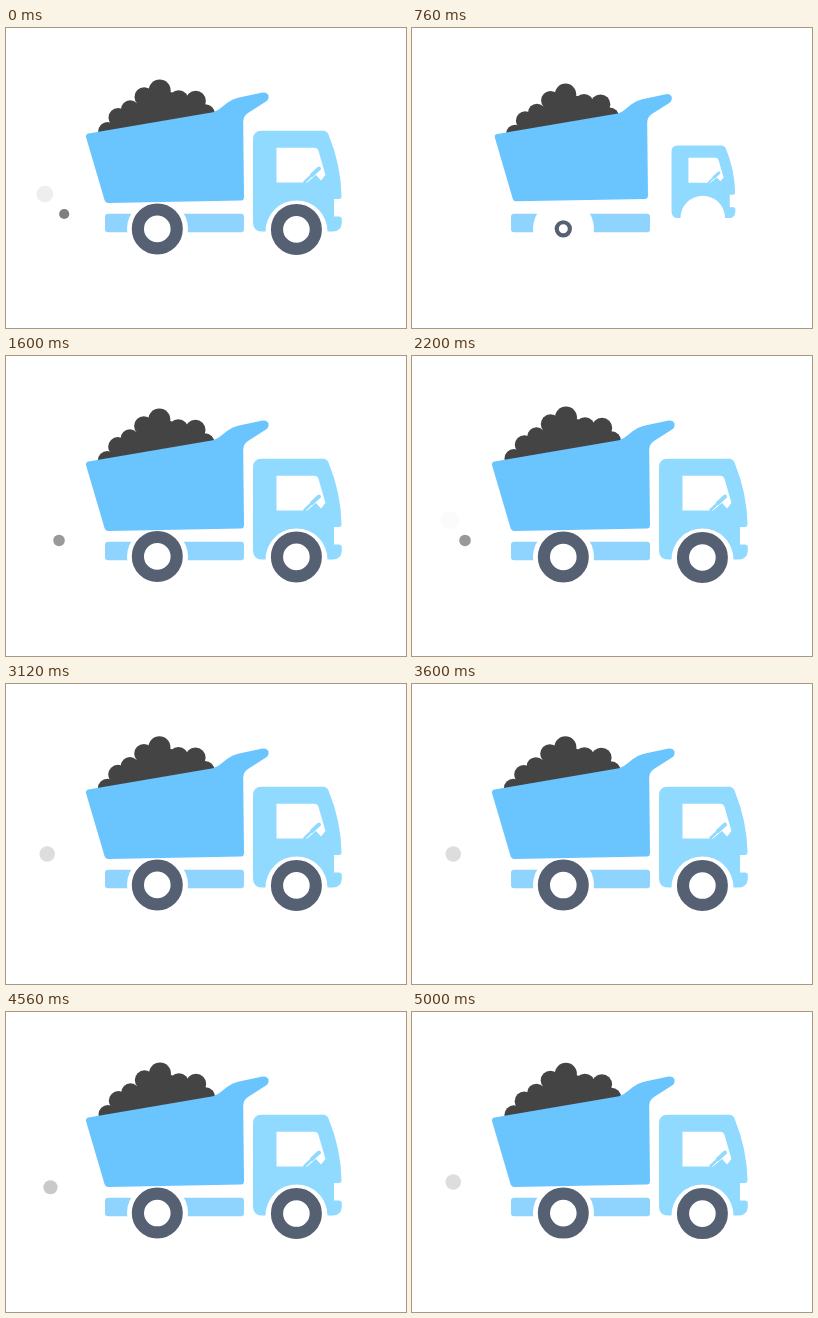
An HTML page that plays this animation: 400x300 px, repeating every 5.04 s.

```html
<!DOCTYPE html>
<html lang="en">
<head>
<meta charset="utf-8">
<title>Dump truck</title>
<style>
  html, body { margin: 0; width: 100%; height: 100%; overflow: hidden; background: #fff; }
  svg { display: block; width: 400px; height: 300px; }
</style>
</head>
<body>
<svg viewBox="0 0 400 300">
  <g id="smoke" fill="#444"></g>
  <g id="chassis">
    <rect x="99" y="185.800" width="139" height="18.5" rx="3" fill="#8fd4ff"/>
    <circle cx="151.5" cy="201" r="30.5" fill="#fff"/>
  </g>
  <g id="tub">
    <g id="coal" fill="#444">
      <path d="M95 108L113 87L125 78L154 60L190 70L208 86V95L100 112Z"/>
      <circle cx="102" cy="102.500" r="9.5"/>
      <circle cx="112.500" cy="88.800" r="9.7"/>
      <circle cx="124.500" cy="80.500" r="9.2"/>
      <circle cx="138.500" cy="68" r="9.7"/>
      <circle cx="154" cy="61.500" r="11"/>
      <circle cx="173" cy="71.300" r="10"/>
      <circle cx="190" cy="72" r="10.2"/>
      <circle cx="199.500" cy="85" r="9.7"/>
    </g>
    <path fill="#6ac5ff" d="M82.500 105.500L207 84.300Q211.500 83 215 79.800L221 74.900Q226 71 232 69.700L256.500 64.500Q261 63.800 262.500 67.500Q263.200 71.500 260 73.500L242 85Q237.300 88 237.200 94L238 169Q238 172.500 235 172.500L102.500 175Q99.500 175 98.500 172L80 109Q79.500 106 82.500 105.500Z"/>
  </g>
  <g id="cab">
    <path fill="#90d9ff" d="M247 111.500Q247 102.800 255.500 102.800H317Q320.800 102.800 322.500 106.500Q335 137 335.500 168Q335.500 171 333 171H328V188.500H333.500Q335.800 188.500 335.800 191V195Q335 203.500 327 203.500H321.500A31 31 0 1 0 259.500 203.500H256Q247 203.500 247 194Z"/>
    <path fill="#fff" d="M270.500 119.700H308Q311.500 119.700 312.500 123L319.500 147L315 152.500L310 147L301 154.500H270.500Z"/>
    <g stroke="#90d9ff" stroke-linecap="round">
      <path stroke-width="2.500" d="M298.500 154L306 147"/>
      <path stroke-width="4" d="M306 147L313 140.500"/>
    </g>
  </g>
  <g fill="none" stroke="#566073" stroke-width="12.2">
    <circle id="rear" cx="151.300" cy="200.800" r="19.4"/>
    <circle id="front" cx="290.400" cy="201.300" r="19.4"/>
  </g>
</svg>
<script>
const LOOP = 5040, STEP = 40, POP = 480;
const el = id => document.getElementById(id);
const wave = (t, period, peak) => Math.cos(2 * Math.PI * (t - peak) / period);

// Each part pops in around its own centre: [id, x, y, start]
const parts = [
  ["chassis", 168.5, 195, 120],
  ["tub", 171, 120, 544],
  ["cab", 291.5, 155.5, 640],
  ["rear", 151.3, 200.8, 714],
  ["front", 290.4, 201.3, 780],
];

// Nine puffs per cycle, then a short pause
const puffs = Array.from({ length: 18 }, (_, i) => {
  const node = document.createElementNS("http://www.w3.org/2000/svg", "circle");
  el("smoke").append(node);
  return { node, birth: 1560 + Math.floor(i / 9) * 1880 + (i % 9) * 200 };
});

function popScale(t) {
  const q = Math.min(1, Math.max(0, t / POP)) - 1;
  return 1 + 2 * q ** 3 + q * q;
}

function drawPuff({ node, birth }, t) {
  const age = (t - birth) / STEP, p = Math.min(1, age / 6);
  const visible = age >= 0 && age < 6.6;
  node.setAttribute("visibility", visible ? "visible" : "hidden");
  if (!visible) return;
  node.setAttribute("cx", 58.2 - 20.5 * (1 - (1 - p) ** 1.6));
  node.setAttribute("cy", 186 - 21.5 * p * p * (3 - 2 * p));
  node.setAttribute("r", 5.1 + 4 * p);
  node.setAttribute("opacity", 0.69 * (1 - age / 6.6) ** 1.45);
}

function draw(now) {
  let t = Math.floor(now % LOOP / STEP) * STEP;
  if (t < STEP) t += LOOP;   // the finished truck holds for one step before it clears

  for (const [id, x, y, start] of parts) {
    const s = popScale(t - start);
    const wheel = id === "rear" || id === "front";
    const bob = wheel && t > start + POP ? -0.4 * wave(t, 354, 1600) : 0;
    el(id).setAttribute("transform", `translate(${x} ${y + bob}) scale(${s}) translate(${-x} ${-y})`);
    el(id).setAttribute("visibility", s > 0.001 ? "visible" : "hidden");
  }
  const drop = t < 1100 ? 3 : 1 + wave(t, 395, 1588);
  el("coal").setAttribute("transform", `translate(${-drop / 3} ${drop})`);
  for (const puff of puffs) drawPuff(puff, t);
}

const begin = performance.now();
function tick() {
  draw(performance.now() - begin);
  requestAnimationFrame(tick);
}
tick();
</script>
</body>
</html>
```
